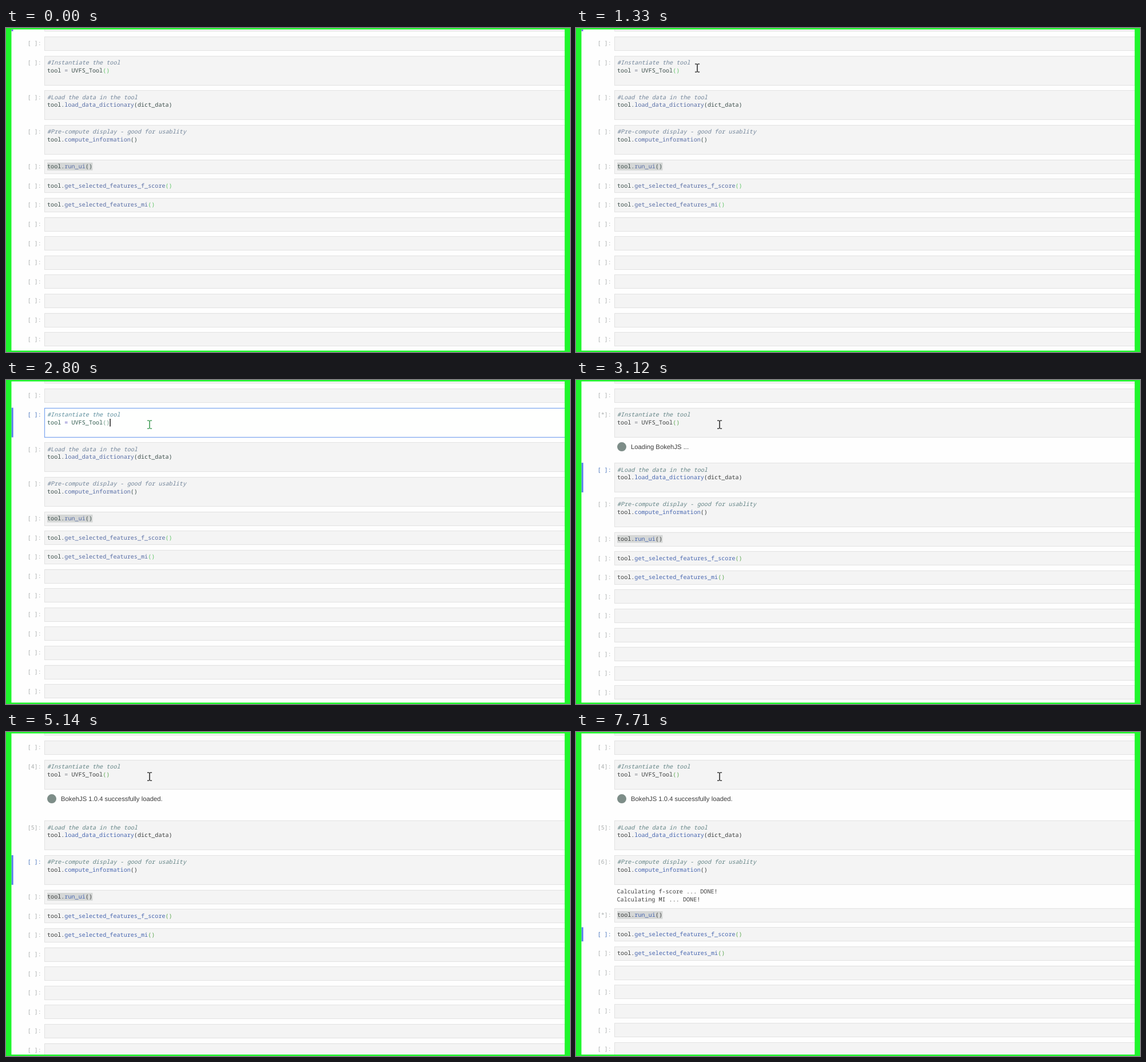
Recreate the animation shown at these times as an HTML page with a canvas. Size 986 by 568 pixels, loop 8 s.

```html
<!DOCTYPE html>
<html lang="en">
<head>
<meta charset="utf-8">
<title>Notebook run</title>
<style>
  html, body { margin: 0; width: 100%; height: 100%; overflow: hidden; background: #fff; }
  canvas { display: block; }
</style>
</head>
<body>
<canvas id="stage" width="986" height="568"></canvas>
<script>
const ctx = document.getElementById('stage').getContext('2d');
const LOOP = 8000;
const MONO = '10.15px "Noto Sans Mono", monospace';
const SANS = '11.3px "Liberation Sans", Arial, sans-serif';
const LINE = 13.6, ROW = 33.6, BOX = 24.8;

// Each code line is a list of [style, text] parts.
const call = (name, args, style = 'text') => [['text', 'tool.'], ['fn', name], [style, `(${args})`]];
const cells = [
  { lines: [] },
  { lines: [[['comment', '#Instantiate the tool']],
            [['text', 'tool '], ['op', '='], ['text', ' UVFS_Tool'], ['bracket', '()']]] },
  { lines: [[['comment', '#Load the data in the tool']], call('load_data_dictionary', 'dict_data')] },
  { lines: [[['comment', '#Pre-compute display - good for usablity']], call('compute_information', '')] },
  { lines: [call('run_ui', '')], marked: true },
  { lines: [call('get_selected_features_f_score', '', 'bracket')] },
  { lines: [call('get_selected_features_mi', '', 'bracket')] },
  ...Array.from({ length: 8 }, () => ({ lines: [] }))
];

const palettes = {
  idle: { text: '#3b4d4a', fn: '#566ca5', comment: '#72859a', op: '#7f8496', bracket: '#5fc566' },
  edit: { text: '#2f594d', fn: '#566ca5', comment: '#5a8c9c', op: '#6a62c4', bracket: '#6a9d85' },
  run:  { text: '#3a3d3d', fn: '#4766b0', comment: '#638486', op: '#85878f', bracket: '#5ba750' }
};

// Pointer positions, one per 78 ms step
const path = [[515, 444], [450, 360], [350, 255], [230, 160], [140, 100], [90, 68],
              [82, 57], [110, 54], [160, 60], [212, 70], [246, 77], [251, 78]];

function rect(x, y, w, h, color) {
  ctx.fillStyle = color;
  ctx.fillRect(x, y, w, h);
}

function write(text, x, y, color, font = MONO) {
  ctx.font = font;
  ctx.fillStyle = color;
  ctx.fillText(text, x, y);
  return x + ctx.measureText(text).width;
}

function drawBox(y, h, editing) {
  rect(67.5, y, 920, h, editing ? '#fefffe' : '#f4f4f4');
  ctx.strokeStyle = editing ? '#82aaf0' : '#e2e2e2';
  ctx.lineWidth = editing ? 1.3 : 1;
  ctx.strokeRect(67.5, Math.round(y) + .5, 920, Math.round(h) - 1);
}

function drawPointer(t) {
  const i = Math.floor((t - 628) / 78);
  if (i < 0) return;
  const [x, y] = path[Math.min(i, path.length - 1)];
  const color = t >= 1720 && t < 3120 ? '#33964a' : '#222';
  rect(x - .7, y - 7, 1.5, 14, color);
  for (const end of [-7.5, 6.5]) {
    rect(x - 4, y + end, 3.4, 1.3, color);
    rect(x + .7, y + end, 3.4, 1.3, color);
  }
}

function promptFor(i, t) {
  if (i === 1 && t >= 3120) return t < 3500 ? '*' : '4';
  if (i === 2 && t >= 5140) return '5';
  if (i === 3 && t >= 7390) return t < 7480 ? '*' : '6';
  if (i === 4 && t >= 7710) return '*';
  return ' ';
}

function outputHeight(i, t) {
  if (i === 1 && t >= 3120) return t < 3500 ? 35.8 : 46;
  if (i === 3 && t >= 7480) return 32;
  return 0;
}

function drawOutput(i, y, t) {
  if (i === 1) {
    ctx.fillStyle = '#7d8d88';
    ctx.beginPath();
    ctx.arc(80, y + 16.6, 8, 0, Math.PI * 2);
    ctx.fill();
    write(t < 3660 ? 'Loading BokehJS ...' : 'BokehJS 1.0.4 successfully loaded.', 96, y + 20, '#3c3c3c', SANS);
  } else {
    write('Calculating f-score ... DONE!', 71.5, y + 15.3, '#414141');
    write('Calculating MI ... DONE!', 71.5, y + 15.3 + LINE, '#414141');
  }
}

function drawCell(i, y, t, active) {
  const { lines, marked } = cells[i];
  const h = BOX + (lines.length > 1 ? 2 * LINE - .1 : 0);
  const editing = i === 1 && t >= 1720 && t < 3120;
  const colors = palettes[t >= 3120 ? 'run' : editing ? 'edit' : 'idle'];
  drawBox(y, h, editing);
  if (i === active) rect(9.5, y, 3.2, h, '#587cee');
  write(`[${promptFor(i, t)}]:`, 37.6, y + 15.4, i === active ? '#4673bd' : '#a9adad');
  if (marked) rect(72, y + 5.3, 79.5, 13.6, '#d5d7d6');
  lines.forEach((parts, row) => {
    let x = 72;
    for (const [style, text] of parts)
      x = write(text, x, y + 15.4 + row * LINE, colors[style], (style === 'comment' ? 'italic ' : '') + MONO);
  });
  if (editing && (t < 2270 || t >= 2800)) rect(181.4, 68, 1.4, 13.5, '#111');
  const extra = outputHeight(i, t);
  if (extra) drawOutput(i, y + h, t);
  return y + h + ROW - BOX + extra;
}

function draw(t) {
  const active = [1720, 3120, 5140, 7390, 7710].filter(start => t >= start).length;
  rect(0, 0, 986, 568, '#fefefe');
  drawBox(-18.6, BOX, false);
  if (!active) rect(9.5, 2.5, 3, 3, '#6a5cf0');
  let y = 15;
  for (let i = 0; i < cells.length && y < 566; i++) y = drawCell(i, y, t, active || -1);
  drawPointer(t);
  const green = '#1ff62c';
  rect(0, 0, 986, 2.5, green);
  rect(0, 565.5, 986, 2.5, green);
  rect(0, 0, 9.5, 568, green);
  rect(976.7, 0, 9.3, 568, green);
}

ctx.textRendering = 'geometricPrecision';
const begin = performance.now();
function frame() {
  draw((performance.now() - begin) % LOOP);
  requestAnimationFrame(frame);
}
frame();
</script>
</body>
</html>
```
